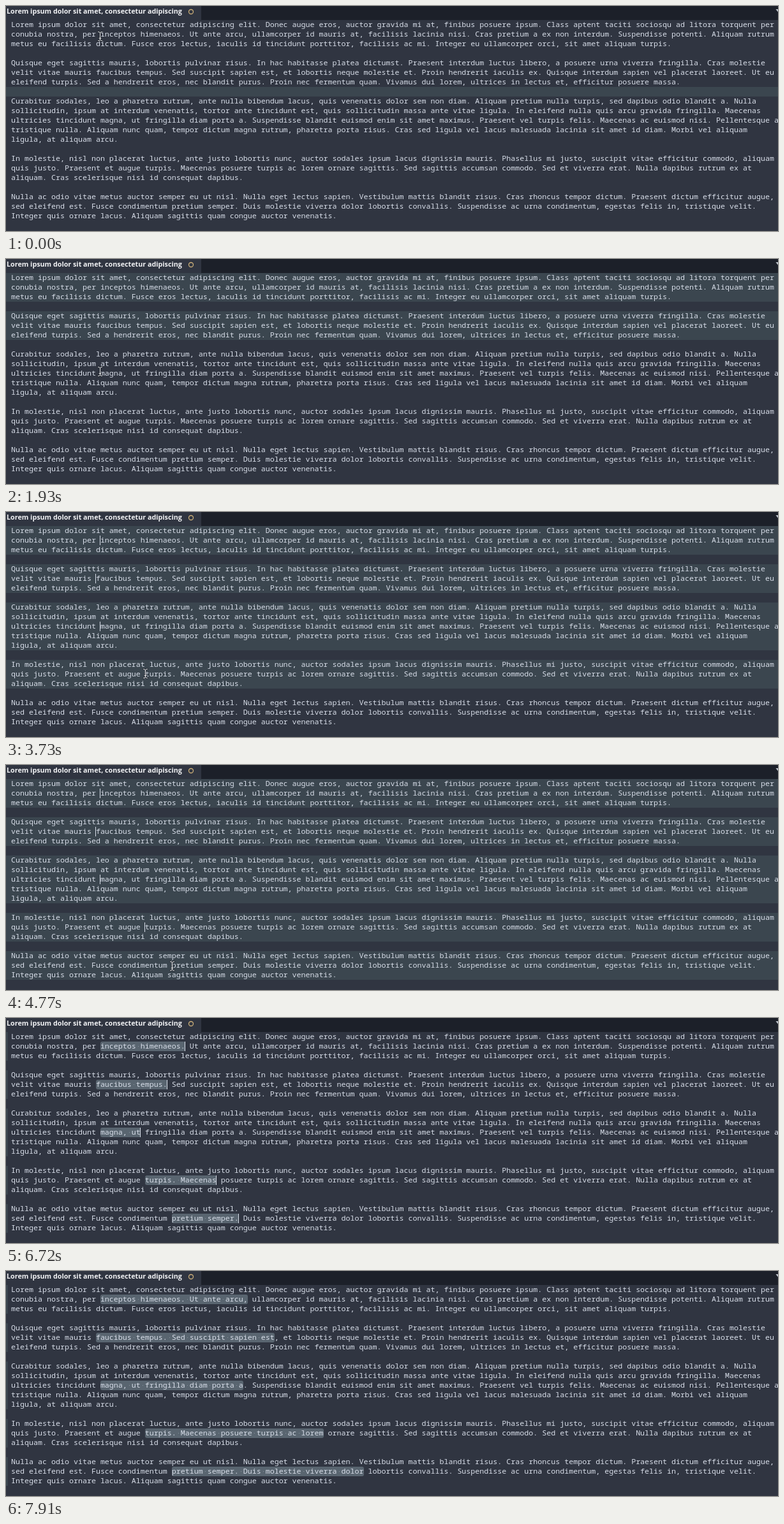
These frames come from a looping animation (1210 by 353 pixels, 8 s). An HTML page:

```html
<!DOCTYPE html>
<html lang="la">
<head>
<meta charset="utf-8">
<title>Multiple carets</title>
<style>
  html, body { margin: 0; width: 100%; height: 100%; overflow: hidden; background: #303541; }
  svg { display: block; }
  .line { font: 11.667px "Noto Sans Mono", "DejaVu Sans Mono", monospace; fill: #d8dee9; }
  .title { font: bold 10.75px "Open Sans", "Noto Sans", sans-serif; fill: #f2f3f5; }
  .active { fill: #3b464f; }
  .selection { fill: #596570; }
  .dot { fill: #87929c; }
  .caret { fill: #d8dee9; }
</style>
</head>
<body>
<svg id="stage" width="1210" height="353" viewBox="0 0 1210 353">
  <rect width="1210" height="22" fill="#1c2029"/>
  <rect width="306" height="22" fill="#303541"/>
  <text class="title" x="1" y="12">Lorem ipsum dolor sit amet, consectetur adipiscing</text>
  <circle cx="290" cy="9" r="3.5" fill="none" stroke="#cdb079" stroke-width="1.3"/>
  <path d="M1206.5 5h8l-4 5z" fill="#c0c5ce"/>
  <g id="back"></g>
  <g id="text"></g>
  <g id="carets"></g>
  <g id="pointer" fill="none" stroke-linecap="round">
    <path stroke="#20242c" stroke-width="2.6" d="M-3-7Q0-7 0-5Q0-7 3-7M0-5V5M-3 7Q0 7 0 5Q0 7 3 7M-1.5 3h3"/>
    <path stroke="#eef0f2" stroke-width="1" d="M-3-7Q0-7 0-5Q0-7 3-7M0-5V5M-3 7Q0 7 0 5Q0 7 3 7M-1.5 3h3"/>
  </g>
</svg>
<script>
const LINES = `Lorem ipsum dolor sit amet, consectetur adipiscing elit. Donec augue eros, auctor gravida mi at, finibus posuere ipsum. Class aptent taciti sociosqu ad litora torquent per
conubia nostra, per inceptos himenaeos. Ut ante arcu, ullamcorper id mauris at, facilisis lacinia nisi. Cras pretium a ex non interdum. Suspendisse potenti. Aliquam rutrum
metus eu facilisis dictum. Fusce eros lectus, iaculis id tincidunt porttitor, facilisis ac mi. Integer eu ullamcorper orci, sit amet aliquam turpis.

Quisque eget sagittis mauris, lobortis pulvinar risus. In hac habitasse platea dictumst. Praesent interdum luctus libero, a posuere urna viverra fringilla. Cras molestie
velit vitae mauris faucibus tempus. Sed suscipit sapien est, et lobortis neque molestie et. Proin hendrerit iaculis ex. Quisque interdum sapien vel placerat laoreet. Ut eu
eleifend turpis. Sed a hendrerit eros, nec blandit purus. Proin nec fermentum quam. Vivamus dui lorem, ultrices in lectus et, efficitur posuere massa.

Curabitur sodales, leo a pharetra rutrum, ante nulla bibendum lacus, quis venenatis dolor sem non diam. Aliquam pretium nulla turpis, sed dapibus odio blandit a. Nulla
sollicitudin, ipsum at interdum venenatis, tortor ante tincidunt est, quis sollicitudin massa ante vitae ligula. In eleifend nulla quis arcu gravida fringilla. Maecenas
ultricies tincidunt magna, ut fringilla diam porta a. Suspendisse blandit euismod enim sit amet maximus. Praesent vel turpis felis. Maecenas ac euismod nisi. Pellentesque a
tristique nulla. Aliquam nunc quam, tempor dictum magna rutrum, pharetra porta risus. Cras sed ligula vel lacus malesuada lacinia sit amet id diam. Morbi vel aliquam
ligula, at aliquam arcu.

In molestie, nisl non placerat luctus, ante justo lobortis nunc, auctor sodales ipsum lacus dignissim mauris. Phasellus mi justo, suscipit vitae efficitur commodo, aliquam
quis justo. Praesent et augue turpis. Maecenas posuere turpis ac lorem ornare sagittis. Sed sagittis accumsan commodo. Sed et viverra erat. Nulla dapibus rutrum ex at
aliquam. Cras scelerisque nisi id consequat dapibus.

Nulla ac odio vitae metus auctor semper eu ut nisl. Nulla eget lectus sapien. Vestibulum mattis blandit risus. Cras rhoncus tempor dictum. Praesent dictum efficitur augue,
sed eleifend est. Fusce condimentum pretium semper. Duis molestie viverra dolor lobortis convallis. Suspendisse ac urna condimentum, egestas felis in, tristique velit.
Integer quis ornare lacus. Aliquam sagittis quam congue auctor venenatis.`.split("\n");

const LOOP = 8000, TICK = 148.9;
const CHAR = 7, ROW = 15, LEFT = 8, TOP = 22;
const SELECT_TICK = 43, WORD_STEPS = 7, HIDE_TICK = 34;

// Each paragraph: first row, row count, caret row, caret column, tick of its click
const CARETS = [
  [0, 3, 1, 20, 1],
  [4, 3, 5, 19, 9],
  [8, 5, 10, 20, 17],
  [14, 3, 15, 30, 25],
  [18, 3, 19, 36, 32]
].map(([first, rows, row, col, click]) => ({ first, rows, row, col, click }));

// Pointer stops: tick, x, y
const STOPS = [
  [0, 147, 47], [1, 147, 47], [6, 139, 107], [9, 139, 107], [14, 148, 184], [15, 148, 184],
  [16, 148, 181], [18, 148, 181], [22, 214, 249], [23, 218, 253], [25, 218, 253], [30, 260, 315], [60, 260, 315]
];
const BLINK_STARTS = [0, 9, 17, 25, 32];

const byId = id => document.getElementById(id);
const colX = col => LEFT + col * CHAR;
const rowY = row => TOP + row * ROW;
const rect = (cls, x, y, w, h, extra = "") =>
  `<rect class="${cls}" x="${x}" y="${y}" width="${w}" height="${h}" ${extra}/>`;

byId("text").innerHTML = LINES.map((line, row) =>
  `<text class="line" x="${LEFT}" y="${rowY(row) + 11}">${line}</text>`).join("");

// Columns reached by repeatedly extending to the next word or punctuation end
for (const caret of CARETS) {
  const rest = LINES[caret.row].slice(caret.col);
  caret.ends = [...rest.matchAll(/\w+|[^\w\s]+/g)].map(m => caret.col + m.index + m[0].length);
}

function selection({ row, col }, end) {
  let out = rect("selection", colX(col), rowY(row), (end - col) * CHAR, ROW, 'rx="3"');
  for (let c = col; c < end; c++)
    if (LINES[row][c] === " ") out += rect("dot", colX(c) + 3, rowY(row) + 7, 1, 1);
  return out;
}

function caretOpacity(tick) {
  const last = tick >= SELECT_TICK
    ? Math.min(tick, SELECT_TICK + WORD_STEPS - 1)
    : Math.max(...BLINK_STARTS.filter(s => s <= tick));
  const phase = (tick - last) % 8;
  return phase < 3 ? 1 : phase === 3 ? 0.5 : 0;
}

function pointerAt(tick) {
  const i = STOPS.findIndex(s => s[0] > tick);
  const [t0, x0, y0] = STOPS[i - 1], [t1, x1, y1] = STOPS[i];
  const u = (tick - t0) / (t1 - t0), k = u * u * (3 - 2 * u);
  return [Math.round(x0 + (x1 - x0) * k), Math.round(y0 + (y1 - y0) * k)];
}

function draw(tick) {
  const steps = Math.max(0, Math.min(tick - SELECT_TICK + 1, WORD_STEPS));
  const placed = CARETS.filter(c => c.click <= tick);
  const opacity = caretOpacity(tick);
  let back = placed.length ? "" : rect("active", 0, rowY(7), 1210, ROW);
  let front = "";
  for (const caret of placed) {
    const end = steps ? caret.ends[steps - 1] : caret.col;
    back += rect("active", 0, rowY(caret.first), steps ? 3 : 1210, caret.rows * ROW);
    if (steps) back += selection(caret, end);
    front += rect("caret", colX(end) - 1, rowY(caret.row), 1, ROW, `opacity="${opacity}"`);
  }
  byId("back").innerHTML = back;
  byId("carets").innerHTML = front;
  const [x, y] = pointerAt(tick);
  byId("pointer").setAttribute("transform", `translate(${x + 0.5} ${y + 0.5})`);
  byId("pointer").setAttribute("visibility", tick < HIDE_TICK ? "visible" : "hidden");
}

const start = performance.now();
let shown = -1;
function frame() {
  const t = (performance.now() - start) % LOOP;
  const tick = Math.floor((t + 8) / TICK);
  if (tick !== shown) draw(shown = tick);
  requestAnimationFrame(frame);
}
frame();
</script>
</body>
</html>
```
